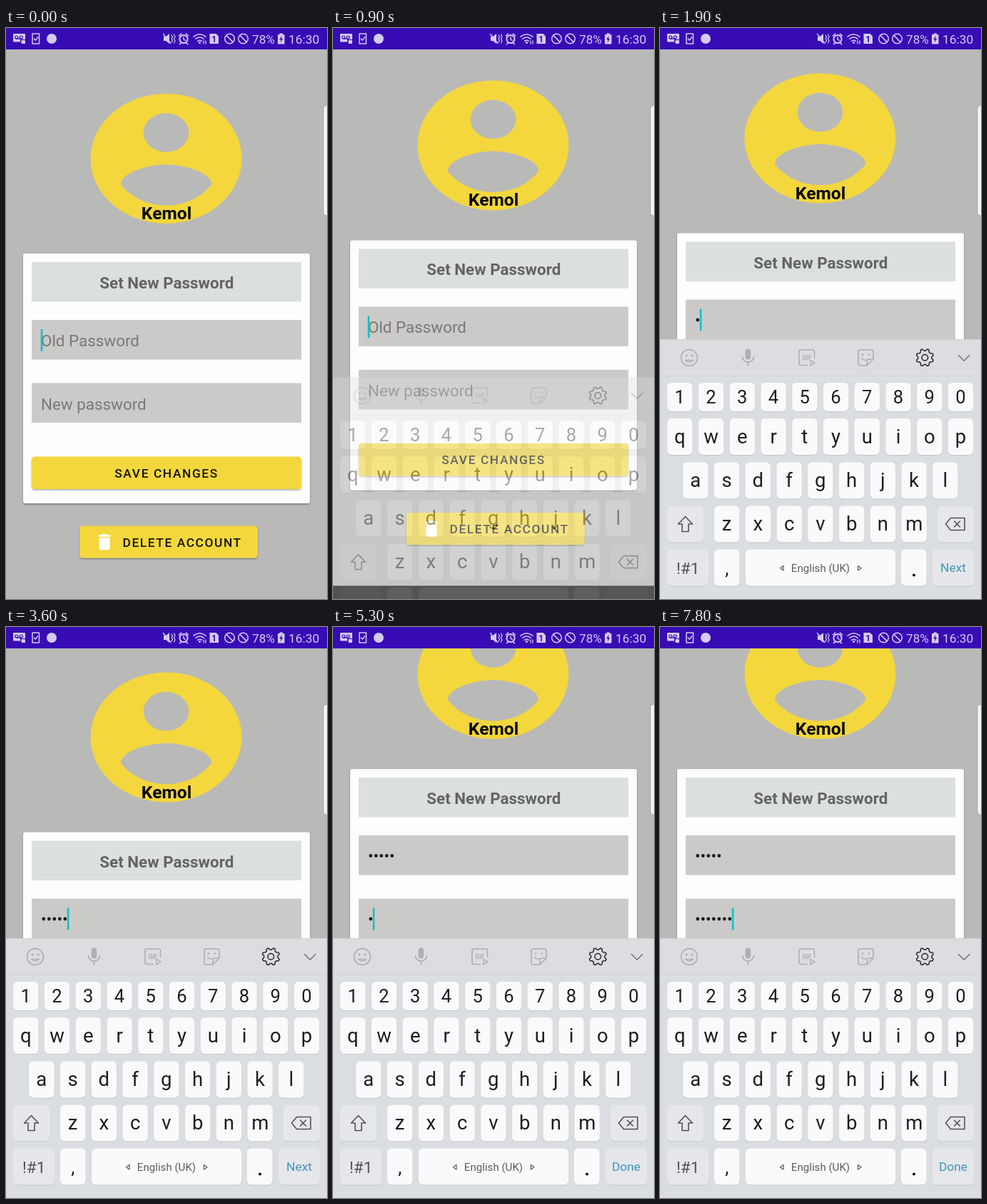
These frames come from a looping animation (450 px wide and 800 px high, 8 s). An HTML page:

```html
<!DOCTYPE html>
<html lang="en">
<head>
<meta charset="utf-8">
<title>Change password</title>
<style>
  html, body { margin: 0; width: 100%; height: 100%; overflow: hidden; background: #000; }
  svg { display: block; width: 100vw; height: 100vh; font-family: Roboto, sans-serif; }
</style>
</head>
<body>
<svg id="stage" viewBox="0 0 450 800" xmlns="http://www.w3.org/2000/svg"></svg>
<script>
const LOOP = 8000, STEP = 100;
const YELLOW = '#f3d73d', PAGE = '#b9b9b8', ICON = '#d5cbf2';

const rect = (x, y, w, h, fill, r = 0, extra = '') =>
  `<rect x="${x}" y="${y}" width="${w}" height="${h}" rx="${r}" fill="${fill}" ${extra}/>`;
const text = (x, y, size, fill, str, extra = '') =>
  `<text x="${x}" y="${y}" font-size="${size}" fill="${fill}" ${extra}>${str}</text>`;
const line = (d, color, w, extra = '') =>
  `<path d="${d}" fill="none" stroke="${color}" stroke-width="${w}" stroke-linecap="round" stroke-linejoin="round" ${extra}/>`;
const shape = (d, fill, extra = '') => `<path d="${d}" fill="${fill}" ${extra}/>`;
const dot = (x, y, r, fill) => `<circle cx="${x}" cy="${y}" r="${r}" fill="${fill}"/>`;
const ring = (x, y, r, color, w) =>
  `<circle cx="${x}" cy="${y}" r="${r}" fill="none" stroke="${color}" stroke-width="${w}"/>`;
const MID = 'text-anchor="middle"';

// Password field with hint, bullets and caret; mid is its centre line
function field(id, mid, hint) {
  let bullets = '';
  for (let i = 0; i < 7; i++) bullets += dot(52.8 + 7.5 * i, mid, 2.4, '#1b1b1b');
  return rect(36, mid - 28.5, 378, 55.5, '#cbcac9') +
    `<g id="hint${id}">${text(49, mid + 8.5, 22.4, '#797978', hint)}</g>` +
    `<g id="dots${id}">${bullets}</g>` +
    rect(0, mid - 15.5, 2.6, 31, '#14bfc6', 0, `id="caret${id}"`);
}

const button = (x, y, w, h) => rect(x, y, w, h, YELLOW, 4.5, 'filter="url(#lift)"');
const caps = (x, y, str) =>
  text(x, y, 17.4, '#15130a', str, 'font-weight="500" letter-spacing="1.555"');

function page() {
  return rect(0, 0, 450, 800, PAGE) +
    `<g transform="translate(224.5 183) scale(10.6 9.1) translate(-12 -12)">
      ${dot(12, 12, 10, YELLOW)}${dot(12, 8, 3, PAGE)}
      ${shape('M12 19.2c-2.5 0-4.71-1.28-6-3.22.03-1.99 4-3.08 6-3.08 1.99 0 5.97 1.09 6 3.08-1.29 1.94-3.5 3.22-6 3.22z', PAGE)}
    </g>` +
    text(225, 268, 24.6, '#050505', 'Kemol', MID + ' font-weight="700"') +
    rect(24, 316, 402, 350, '#fefdfe', 3, 'filter="url(#lift)"') +
    rect(36, 328, 378, 55.5, '#dcdfe0') +
    text(225.3, 365, 22.4, '#646464', 'Set New Password', MID + ' font-weight="700"') +
    field(1, 437.5, 'Old Password') +
    field(2, 526, 'New password') +
    button(36, 600.5, 378, 45.5) + caps(152.3, 629.8, 'SAVE CHANGES') +
    button(103, 697.5, 250, 45) + caps(163.5, 726.5, 'DELETE ACCOUNT') +
    shape('M6 19c0 1.1.9 2 2 2h8c1.1 0 2-.9 2-2V7H6v12zM19 4h-3.5l-1-1h-5l-1 1H5v2h14V4z', '#fff',
      'transform="translate(123.2 705.2) scale(1.24)"');
}

function statusBar() {
  const noEntry = x => ring(x, 15, 6.8, ICON, 1.5) + line(`M${x - 4.6} 10.4l9.2 9.2`, ICON, 1.5);
  return rect(0, 0, 450, 30, '#370cb5') +
    // voicemail
    rect(10, 8, 17, 11.5, ICON, 1) + ring(14.8, 13, 2, '#370cb5', 1.2) + ring(21.3, 13, 2, '#370cb5', 1.2) +
    line('M14.8 15.2h6.5', '#370cb5', 1.2) + rect(20, 16, 8, 7, '#370cb5') + rect(21.5, 17, 5.5, 5, ICON, 1) +
    // phone with tick
    line('M37 8h9.5v14H37z', ICON, 1.5) + line('M39.3 15l2 2.2 3.4-4.4', ICON, 1.4) +
    dot(64, 15, 7, ICON) +
    // muted speaker
    shape('M221 12h3.2l4.8-4v14l-4.8-4H221z', ICON) + line('M220.5 8.5l10.5 13', ICON, 1.4) +
    line('M232 10l1.6 2.4-1.6 2.4 1.6 2.6-1.6 2.4M235.5 9l1.6 3-1.6 3 1.6 3-1.6 3', ICON, 1.2) +
    // alarm
    ring(249, 15.5, 5.6, ICON, 2) + line('M249 12.5v3.4l2.4 1.4', ICON, 1.4) +
    line('M242.5 11l3.2-3M255.5 11l-3.2-3M245 21l-1.4 1.6M253 21l1.4 1.6', ICON, 1.6) +
    // wifi
    line('M263 12.2q8.5-7 17 0M265.8 15.3q5.7-4.6 11.4 0M268.6 18.3q2.9-2.2 5.8 0', ICON, 1.5) +
    dot(271.5, 20.5, 1.5, ICON) + line('M277 22v-4M280 18v4', ICON, 1.3) +
    shape('M285.5 8h9l3.5 3.5V22h-12.500z', ICON) +
    text(291.7, 19.5, 12, '#370cb5', '1', MID + ' font-weight="700"') +
    noEntry(313.500) + noEntry(332.5) +
    text(345, 22, 17.2, ICON, '78%') +
    shape('M383.500 7.500h4.500v1.700h2.500v13.300h-9.500v-13.300h2.500z', ICON) +
    shape('M386.800 10.500l-3.600 5.700h2.300l-.8 4.500 3.600-5.900h-2.400z', '#370cb5') +
    text(396, 22, 17.4, ICON, '16:30');
}

function gear(cx, cy) {
  let d = '';
  for (let i = 0; i < 32; i++) {
    const a = (i + 0.5) / 32 * Math.PI * 2;
    const r = i % 4 === 1 || i % 4 === 2 ? 12.3 : 9.6;
    d += `${i ? 'L' : 'M'}${(cx + r * Math.sin(a)).toFixed(1)} ${(cy - r * Math.cos(a)).toFixed(1)}`;
  }
  return line(d + 'z', '#26282b', 1.5) + ring(cx, cy, 4.3, '#26282b', 1.5);
}

function toolbar() {
  const c = '#adafb2';
  return ring(41, 462, 11.4, c, 1.6) + dot(37, 459, 1.6, c) + dot(45, 459, 1.6, c) +
    line('M35.500 465.500q5.500 5 11 0z', c, 1.5) +
    rect(119.700, 449.500, 7.500, 15, c, 3.700) + line('M115.500 460.500a8 7.700 0 0 0 16 0M123.500 468.500v4.500', c, 1.7) +
    line('M206 472.500h-8.500a2.500 2.500 0 0 1-2.500-2.500v-16.500a2.500 2.500 0 0 1 2.500-2.500h16.500a2.500 2.500 0 0 1 2.500 2.500v9', c, 1.6) +
    text(206, 464.500, 8.5, c, 'GIF', MID + ' font-weight="700"') + line('M211 465.500l6 3.700-6 3.700z', c, 1.4) +
    line('M290 473h-9.500a2.500 2.500 0 0 1-2.500-2.500v-17a2.500 2.500 0 0 1 2.500-2.500h16a2.500 2.500 0 0 1 2.500 2.500v10.500zv-6q0-3 3-3h6', c, 1.6) +
    dot(284, 457.500, 1.3, c) + dot(293, 457.500, 1.3, c) + line('M282.500 462q2.500 4 6 3', c, 1.4) +
    gear(371.300, 461.800) + line('M418.500 458.500l7.700 7.700 7.700-7.700', '#707377', 1.5);
}

function keyboard() {
  const LIGHT = '#fafafb', DIM = '#e5e7ea', INK = '#1d1e20', GREY = '#505357';
  const key = (x, y, w, h, fill = LIGHT) =>
    rect(x, y + 1, w, h, '#c4c8cd', 6) + rect(x, y, w, h, fill, 6);
  const row = (chars, x, y, h, size, base) => [...chars].map((ch, i) => {
    const cx = x + 43.75 * i;
    return key(cx - 17.6, y, 35.2, h) + text(cx, base, size, INK, ch, MID);
  }).join('');
  return rect(0, 436.500, 450, 363.500, '#dadde1') + rect(0, 436.500, 450, 51, '#dcdde0') +
    rect(0, 436, 450, 1, '#cfd0d2') + rect(0, 487, 450, 1, '#d2d4d8') + toolbar() +
    row('1234567890', 27.8, 497, 40, 25.6, 526) +
    row('qwertyuiop', 27.8, 547, 51, 27.5, 582) +
    row('asdfghjkl', 49.8, 608.5, 51, 27.5, 643) +
    row('zxcvbnm', 93.700, 669.500, 51, 27.5, 704) +
    key(10, 669.500, 51, 51, DIM) + key(389, 669.500, 51, 51, DIM) +
    line('M35.500 684.500l10 10.500h-5.500v10.500h-9v-10.500h-5.500z', GREY, 1.6) +
    line('M400.500 695l7-8.500h19.500v17h-19.500zM412.500 691l8 8M420.500 691l-8 8', GREY, 1.6) +
    key(10, 730.5, 58, 51, DIM) + text(39.2, 764.5, 22.5, GREY, '!#1', MID) +
    key(76, 730.5, 35.500, 51) + text(93.8, 766, 26, INK, ',', MID) +
    key(120, 730.5, 210, 51) + text(225, 762, 15.1, '#5a5d61', 'English (UK)', MID) +
    line('M173 753.500v6.500l-4.500-3.250zM277.500 753.500v6.500l4.500-3.250z', '#5a5d61', 1.2) +
    key(338, 730.5, 35.500, 51) + dot(356, 766.5, 2.1, INK) +
    key(382, 730.5, 58, 51, DIM) + text(411, 762, 17.4, '#4396bc', 'Next', MID + ' id="action"');
}

const stage = document.getElementById('stage');
stage.innerHTML = `<defs><filter id="lift" x="-10%" y="-10%" width="120%" height="140%">
    <feDropShadow dx="0" dy="1.5" stdDeviation="1.3" flood-color="#000" flood-opacity=".35"/>
  </filter></defs>` +
  rect(0, 0, 450, 800, '#000') +
  `<g id="page">${page()}</g><g id="keys">${keyboard()}</g>${statusBar()}` +
  rect(445, 108.5, 12, 154.5, '#f4f4f4', 4, 'stroke="#a3a3a3" stroke-width="1"');

const el = id => document.getElementById(id);
const show = (node, on) => node.setAttribute('visibility', on ? 'visible' : 'hidden');
const progress = (t, start, dur) => Math.min(1, Math.max(0, (t - start) / dur));
const easeOut = p => 1 - (1 - p) ** 2;

const FOCUS_NEXT = 4500;
const typed = { 1: [1900, 2100, 2300, 2400, 2600], 2: [5300, 5700, 5800, 6100, 6300, 7400, 7700] };
const resets = [-400, 600, ...typed[1], FOCUS_NEXT, ...typed[2]];

// The caret blinks every half second, restarting at each key press
function caretOn(t) {
  const last = Math.max(...resets.filter(r => r <= t));
  return Math.floor((t - last) / 500) % 2 === 0;
}

function drawField(id, t, focused) {
  const n = typed[id].filter(k => k <= t).length;
  show(el('hint' + id), n === 0);
  [...el('dots' + id).children].forEach((b, i) => show(b, i < n));
  const caret = el('caret' + id);
  caret.setAttribute('x', 48.700 + 7.5 * n - (n ? 0.4 : 0));
  show(caret, focused && caretOn(t));
}

function draw(t) {
  const pan = 28.5 * easeOut(progress(t, 736, 400)) + 88.5 * easeOut(progress(t, 4407, 385));
  el('page').setAttribute('transform', `translate(0 ${-pan})`);

  const rise = progress(t, 750, 400);
  el('keys').setAttribute('transform', `translate(0 ${85 * (1 - rise)})`);
  el('keys').setAttribute('opacity', rise);
  el('action').textContent = t < 4600 ? 'Next' : 'Done';

  drawField(1, t, t < FOCUS_NEXT);
  drawField(2, t, t >= FOCUS_NEXT);
}

const start = performance.now();
function tick() {
  const t = Math.max(0, performance.now() - start) % LOOP;
  draw(Math.floor((t + 5) / STEP) * STEP % LOOP);
  requestAnimationFrame(tick);
}
tick();
</script>
</body>
</html>
```
